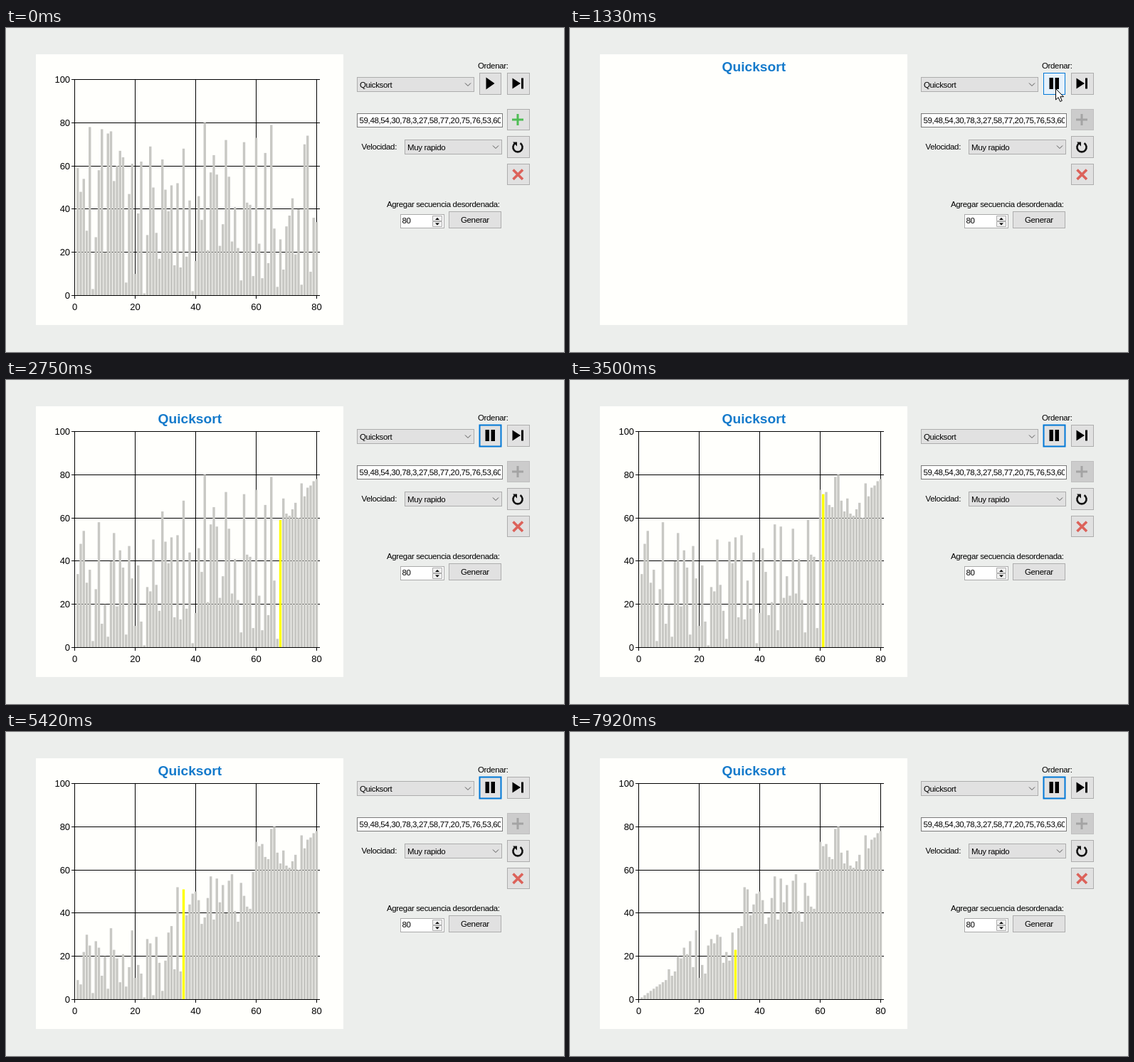
Animation of 784 by 456 pixels, one loop 8 s. Source, as an HTML page:

```html
<!DOCTYPE html>
<html lang="es">
<head>
<meta charset="utf-8">
<title>Quicksort</title>
<style>
html, body { margin: 0; width: 100%; height: 100%; overflow: hidden; background: #eceeec; }
svg { display: block; }
text { font: 11.5px "Liberation Sans", Arial, sans-serif; letter-spacing: -.36px; fill: #000; }
.axis text { font-size: 13px; letter-spacing: -.1px; }
.title { font-size: 19.2px; font-weight: bold; letter-spacing: 0; fill: #147acb; }
.button, .combo { fill: #e1e1e1; stroke: #adadad; }
.field { fill: #fff; stroke: #7a7a7a; }
.chevron { fill: none; stroke: #555; }
.hover { fill: #e5f1fb; stroke: #0078d7; }
.focus { stroke: #0078d7; stroke-width: 2; }
.off { fill: #ccc; stroke: #bfbfbf; }
</style>
</head>
<body>
<svg width="784" height="456" viewBox="0 0 784 456">
  <path d="M42 37H474V418H42Z" fill="#fffffc"/>
  <text class="title" id="title" x="258.3" y="61" text-anchor="middle">Quicksort</text>
  <g id="chart">
    <g class="axis" id="grid"></g>
    <g id="bars"></g>
    <path d="M92 376.5H441" stroke="#000"/>
  </g>

  <text x="663" y="57">Ordenar:</text>
  <rect class="combo" x="493.5" y="69.5" width="164" height="20"/>
  <text x="497" y="84">Quicksort</text>
  <path class="chevron" d="M645 77.5l4 4 4-4"/>

  <rect id="run" x="665.5" y="63.5" width="30" height="30"/>
  <path id="play" d="M674.5 69.5L686.5 78L674.5 86.5Z"/>
  <path id="pause" d="M673.5 70h5.5v16h-5.5zM681.5 70h5.5v16h-5.5z"/>
  <rect class="button" x="704.5" y="63.5" width="31" height="30"/>
  <path d="M711.5 70.5L723 78L711.5 85.5ZM724 70.5h3v15h-3z"/>

  <rect class="field" x="493.5" y="120.5" width="204" height="19"/>
  <svg x="495" y="121" width="200" height="18"><text id="sequence" x="1.5" y="13"></text></svg>
  <rect id="add" x="704.5" y="114.5" width="31" height="29"/>
  <path id="plus" d="M711 129h16M719 121v16" stroke-width="3"/>

  <text x="499.5" y="171">Velocidad:</text>
  <rect class="combo" x="560.5" y="157.5" width="136" height="20"/>
  <text x="564" y="172">Muy rapido</text>
  <path class="chevron" d="M684 165.5l4 4 4-4"/>

  <rect class="button" x="704.5" y="152.5" width="31" height="30"/>
  <path d="M722.5 162.2A6.6 6.6 0 1 1 715.5 162.2" fill="none" stroke="#111" stroke-width="2.6"/>
  <path d="M712 160.5h6v6z" fill="#111"/>
  <rect class="button" x="704.5" y="191.5" width="31" height="29"/>
  <path d="M712.5 199.5l13.5 13.5M726 199.5L712.5 213" stroke="#dc625a" stroke-width="3.6"/>

  <text x="535" y="252">Agregar secuencia desordenada:</text>
  <rect class="field" x="554.5" y="262.5" width="61" height="19" style="stroke:#aaa"/>
  <text x="556.5" y="275">80</text>
  <path d="M599.5 264.5h13v7h-13zM599.5 272.5h13v7h-13z" fill="#f0f0f0" stroke="#adadad"/>
  <path d="M603 270l3-3 3 3zM603 274.5l3 3 3-3z"/>
  <rect class="button" x="622.5" y="258.5" width="73" height="23"/>
  <text x="639" y="274">Generar</text>

  <path id="cursor" d="M0 0V15.5L3.6 12.2L6.2 18L8.8 16.8L6.3 11.2H11Z" fill="#fff" stroke="#000"/>
</svg>
<script>
const LOOP = 8000, FPS = 12;
const values = [
  59,48,54,30,78,3,27,58,77,20,75,76,53,60,67,64,6,47,61,10,
  38,62,1,28,69,50,29,17,63,49,39,51,14,52,13,68,18,44,2,16,
  46,35,80,21,57,65,56,23,33,72,55,25,41,22,7,71,43,42,9,73,
  24,8,66,15,79,31,4,26,12,32,37,45,19,40,5,70,74,11,36,34];

// Pace: [tick, swaps done]
const pace = [[20, 0], [21, 1], [30, 16], [33, 21], [52, 45], [65, 61], [80, 78], [90, 83], [95, 87], [96, 88]];
// Pointer: [tick, x, y]
const pointer = [[3, 800, 190], [4, 756, 160], [6, 716, 118], [8, 687, 92], [10, 682.5, 85.5],
  [20, 682.5, 85.5], [22, 712, 104], [24, 772, 146], [25, 800, 170]];
const START = 14, REDRAW = 19;

const $ = id => document.getElementById(id);
const xAt = n => 96.5 + 4.25 * n;
const yAt = n => 376.5 - 3.04 * n;
const show = (id, on) => $(id).style.display = on ? '' : 'none';

function at(table, tick, column) {
  const next = table.findIndex(row => row[0] > tick);
  if (next === 0) return table[0][column];
  if (next < 0) return table[table.length - 1][column];
  const a = table[next - 1], b = table[next];
  return a[column] + (b[column] - a[column]) * (tick - a[0]) / (b[0] - a[0]);
}

// Every swap of the sort, with the bars after it and the right pointer
function quicksortSteps(list) {
  const a = [...list], steps = [{ bars: [...a], mark: -1 }];
  const swap = (i, j) => {
    if (i === j) return;
    [a[i], a[j]] = [a[j], a[i]];
    steps.push({ bars: [...a], mark: j });
  };
  const sort = (from, to) => {
    if (from >= to) return;
    const pivot = a[from];
    let lo = from, hi = to;
    while (lo < hi) {
      while (lo < hi && a[hi] >= pivot) hi--;
      swap(lo, hi);
      while (lo < hi && a[lo] <= pivot) lo++;
      swap(lo, hi);
    }
    sort(from, lo - 1);
    sort(lo + 1, to);
  };
  sort(0, a.length - 1);
  return steps;
}

function drawGrid() {
  let lines = 'M96.5 72V381', labels = '';
  for (let n = 0; n <= 100; n += 20) {
    const y = Math.floor(yAt(n)) + .5;
    lines += `M92 ${y}H441`;
    labels += `<text x="90" y="${y + 4.5}" text-anchor="end">${n}</text>`;
    if (n > 80) continue;
    const x = Math.floor(xAt(n)) + .5;
    lines += `M${x} 72V381`;
    labels += `<text x="${x}" y="397" text-anchor="middle">${n}</text>`;
  }
  $('grid').innerHTML = `<path d="${lines}" stroke="#000"/>${labels}`;
}

drawGrid();
$('sequence').textContent = values.slice(0, 15).join(',');
$('bars').innerHTML = values.map((_, i) => `<rect x="${xAt(i + 1) - 1.7}" width="3.4"/>`).join('');
const bars = [...$('bars').children];
const steps = quicksortSteps(values);

function render(tick) {
  const running = tick >= START;
  show('title', running);
  show('chart', !running || tick >= REDRAW);
  show('play', !running);
  show('pause', running);

  const over = tick >= 8 && tick <= 21;
  $('run').setAttribute('class', 'button ' + (over ? 'hover' : running ? 'focus' : ''));
  $('add').setAttribute('class', 'button ' + (running ? 'off' : ''));
  $('plus').setAttribute('stroke', running ? '#a4a4a4' : '#4fbd55');
  $('cursor').setAttribute('transform', `translate(${at(pointer, tick, 1)} ${at(pointer, tick, 2)})`);

  const step = steps[Math.floor(at(pace, tick, 1) + 1e-6)];
  bars.forEach((bar, i) => {
    const y = yAt(step.bars[i]);
    bar.setAttribute('y', y);
    bar.setAttribute('height', 376.5 - y);
    bar.setAttribute('fill', i === step.mark ? '#ff0' : '#c8c8c4');
  });
}

const origin = performance.now();
let shown = -1;
function loop() {
  const time = (performance.now() - origin) % LOOP;
  const tick = Math.min(95, Math.floor((time + 5) * FPS / 1000));
  if (tick !== shown) render(shown = tick);
  requestAnimationFrame(loop);
}
loop();
</script>
</body>
</html>
```
